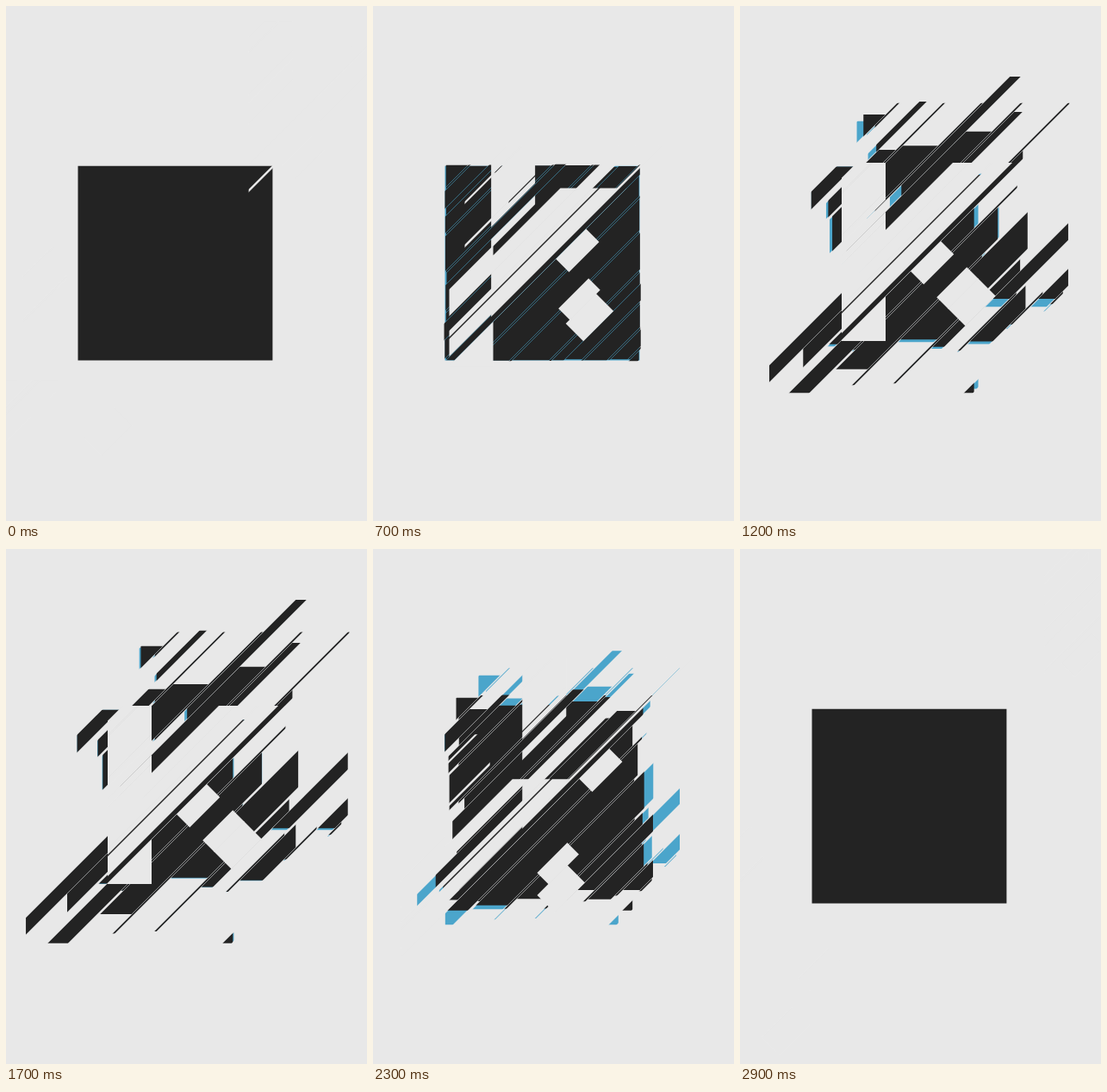
These frames come from a looping animation (419 by 598 pixels, 3100 ms). An HTML page with a canvas:

```html
<!DOCTYPE html>
<html lang="en">
<head>
<meta charset="utf-8">
<title>Sliced square</title>
<style>
  html, body { margin: 0; width: 100%; height: 100%; overflow: hidden; background: #e8e8e8; }
  canvas { display: block; }
</style>
</head>
<body>
<canvas id="stage" width="419" height="598"></canvas>
<script>
const ctx = document.getElementById('stage').getContext('2d');
const PAPER = '#e8e8e8', INK = '#232323', BLUE = '#4ba5cb';
const LOOP = 3100, STEP = 100, CLOSED = 2900;

const square = new Path2D('M83.5 185.8H309.4V411.6H83.5Z');
const stemAndArm = new Path2D('M118 182H169V389H118Z M169 260L247 182H324L169 337Z');
const leg = new Path2D('M198 308L233 273L313 353L278 388Z');

// Main slices of the square: where x + y ends, and the furthest slide up-right
const mainSlices = [
  [298, 76], [319, -1], [328, 95], [351, 24], [395, 30], [408, 132], [441, 51],
  [451, 80], [471, -63], [493, -13], [496, 93], [506, 24], [533, -48], [573, -13],
  [619, 31], [633, 20], [656, 91], [686, 28], [709, 91], [720, -48]
];

// Wide slices shed a sliver, which flies further the further it lies from the leg
function shedSlivers(list) {
  const out = [];
  let from = 269;
  for (const [to, slide] of list) {
    const edge = to - from > 22 ? to - 3 : to;
    out.push({ from, to: edge, slide });
    if (edge < to) {
      out.push({ from: edge, to, slide: Math.min(93, 1.3 * Math.abs(to - 595) - 65) });
    }
    from = to;
  }
  return out;
}
const slices = shedSlivers(mainSlices);

// Bands of the letter; the gaps between them stay dark
const UP = 98, DOWN = -151, THIN = -59;
const armBands = [
  [318, 334, UP], [334, 336, THIN], [336, 384, UP], [384, 386.5, THIN], [386.5, 393.5, UP],
  [408.5, 418, UP], [418, 448, DOWN], [448, 466, UP], [466, 472.5, DOWN],
  [475.5, 495, DOWN], [495, 497.5, UP], [506.5, 560, DOWN]
];
const legBands = [[506, 536, 73], [567, 593, -67], [593, 633, -90]];

// Spring out, then fall back
function spread(t, out, back) {
  if (t < out || t >= CLOSED) return 0;
  const rise = 1.01 * (1 - Math.exp((out - t) / 335));
  return rise * Math.exp(Math.min(0, back - t) / 300);
}

// Cosine ease from 0 to 1
function ease(x) {
  return (1 - Math.cos(Math.PI * Math.min(1, Math.max(0, x)))) / 2;
}

// Fill the part of a shape with a < x + y < b, moved along the diagonal
function band(shape, a, b, d) {
  ctx.save();
  ctx.translate(d, -d);
  ctx.beginPath();
  ctx.moveTo(a, 0);
  ctx.lineTo(b, 0);
  ctx.lineTo(b - 600, 600);
  ctx.lineTo(a - 600, 600);
  ctx.clip();
  ctx.fill(shape);
  ctx.restore();
}

function drawSquare(color, amount, seam) {
  ctx.fillStyle = color;
  if (amount === 0) return ctx.fill(square);
  for (const s of slices) band(square, s.from + seam, s.to - seam, s.slide * amount);
}

function drawLetter(away) {
  ctx.fillStyle = PAPER;
  for (const [a, b, d] of armBands) band(stemAndArm, a - .4, b + .4, d * away);
  for (const [a, b, d] of legBands) band(leg, a - .4, b + .4, d * away);
}

function draw(t) {
  ctx.fillStyle = PAPER;
  ctx.fillRect(0, 0, 419, 598);
  const ink = spread(t, 695, 1770);
  if (ink > 0) drawSquare(BLUE, spread(t, 820, 2100), .9);
  drawSquare(INK, ink, .3);
  drawLetter(1.67 * (1 - ease(t / 900)) + 2.4 * ease((t - 2010) / 900));
}

const start = performance.now();
function tick() {
  const t = (performance.now() - start) % LOOP;
  draw(Math.floor(t / STEP) * STEP);
  requestAnimationFrame(tick);
}
tick();
</script>
</body>
</html>
```
